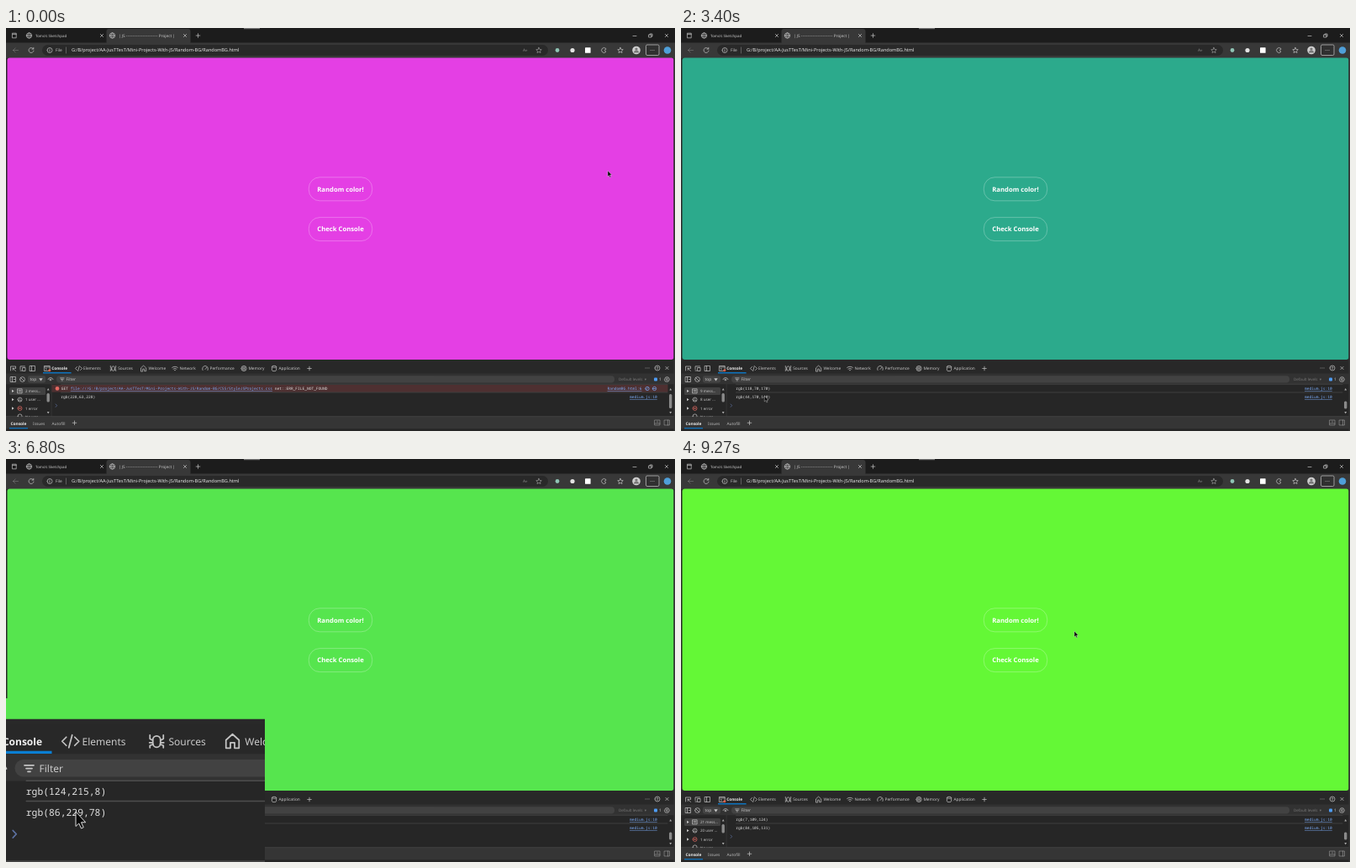
An HTML page for the animation above (9.33 s loop, 796x480 px).

```html
<!DOCTYPE html>
<html lang="en">
<head>
<meta charset="utf-8">
<title>Random color</title>
<style>
  html, body { margin: 0; width: 100%; height: 100%; overflow: hidden; background: #262626; }
  svg { display: block; width: 796px; height: 480px; }
  text { font-family: "Noto Sans", "Open Sans", sans-serif; font-size: 4.8px; font-weight: 500;
         fill: #c9c9c9; text-rendering: geometricPrecision; white-space: pre; }
  .mono { font-family: "Noto Sans Mono", "DejaVu Sans Mono", monospace; font-size: 4.56px; fill: #e0e0e0; }
  .btn { font-weight: 700; font-size: 7.7px; fill: #fff; text-anchor: middle; }
  .icon { fill: none; stroke: #c4c4c4; stroke-width: .7; stroke-linecap: round; stroke-linejoin: round; }
  .link { fill: #7cacf8; text-decoration: underline; }
</style>
</head>
<body>
<svg viewBox="0 0 796 480">
  <defs><clipPath id="crop"><rect x="-20" y="385" width="199" height="95"/></clipPath></defs>
  <g id="scene"></g>
  <g id="lens"><use href="#scene" clip-path="url(#crop)"/></g>
</svg>
<script>
const LOOP = 9330, LOG_LAG = 125, FLASH = 65;
const NS = 'http://www.w3.org/2000/svg';
const scene = document.getElementById('scene');
const lens = document.getElementById('lens');

// click time, r, g, b
const clicks = [
  [-500, 228, 63, 228], [270, 96, 168, 70], [730, 50, 96, 180], [1270, 204, 150, 74],
  [1730, 46, 105, 111], [2200, 145, 34, 39], [2670, 118, 70, 170], [3200, 44, 170, 140],
  [3670, 82, 146, 32], [4200, 229, 92, 45], [4670, 70, 130, 200], [5200, 220, 76, 242],
  [5600, 231, 251, 104], [6200, 124, 215, 8], [6650, 86, 229, 78], [7200, 180, 90, 120],
  [7470, 75, 112, 9], [7800, 83, 227, 48], [8330, 7, 109, 124], [8730, 84, 105, 131],
  [9200, 100, 248, 54]
];

// time, x, y of the pointer tip
const path = [
  [0, 716, 170], [1730, 716, 170], [2300, 22, 476], [2600, 30, 474], [2900, 80, 446],
  [3600, 104, 436], [4200, 104, 436], [4500, 386, 248], [4720, 386, 248], [5130, 104, 452],
  [5730, 94.6, 456.6], [6500, 90, 441], [6800, 89, 439], [7200, 89, 439],
  [7600, 468, 205], [LOOP, 468, 205]
];

function add(tag, attrs, parent = scene) {
  const el = document.createElementNS(NS, tag);
  for (const k in attrs) el.setAttribute(k, attrs[k]);
  parent.append(el);
  return el;
}
const rect = (x, y, width, height, fill, rx = 0, more = {}) =>
  add('rect', { x, y, width, height, fill, rx, ...more });
const dot = (cx, cy, r, fill) => add('circle', { cx, cy, r, fill });
function text(x, y, str, attrs = {}) {
  const el = add('text', { x, y, ...attrs });
  el.textContent = str;
  return el;
}
const icon = (x, y, d, attrs = {}) =>
  add('path', { d, class: 'icon', transform: `translate(${x} ${y})`, ...attrs });

const ring = r => `M${-r} 0a${r} ${r} 0 1 0 ${2 * r} 0a${r} ${r} 0 1 0 ${-2 * r} 0`;
const ICON = {
  globe: ring(3.2) + 'M-3.2 0H3.2M0-3.2C-2-1-2 1 0 3.2C2 1 2-1 0-3.2',
  close: 'M-1.6-1.6L1.6 1.6M1.6-1.6L-1.6 1.6',
  plus: 'M-2.3 0H2.3M0-2.3V2.3',
  reload: 'M2.6-1.6A3 3 0 1 0 3 .6M2.8-3.2V-1.4H1',
  star: 'M0-3.2L1-1L3.2-.8L1.6 .8L2 3L0 1.9L-2 3L-1.6 .8L-3.2-.8L-1-1Z',
  code: 'M-2-2L-4 0L-2 2M2-2L4 0L2 2M.8-3L-.8 3',
  bug: 'M-1.8-.8A1.8 1.8 0 0 1 1.8-.8V1A1.8 1.8 0 0 1-1.8 1ZM-3.2-3V-1.2L-1.8-.4M3.2-3V-1.2L1.8-.4M-3.4 .6H-1.8M3.4 .6H1.8M-3.2 3V2L-1.6 1.4M3.2 3V2L1.6 1.4',
  home: 'M-3.1 3.2V-.6L0-3.4L3.1-.6V3.2H1V.6H-1V3.2Z',
  wifi: 'M-3.4-1A5 5 0 0 1 3.4-1M-2 .6A3 3 0 0 1 2 .6M-.5 2.1H.5',
  gauge: 'M-3 2A3.4 3.4 0 1 1 3 2M0 1L2-1.4',
  memory: ring(3.1) + 'M-1.2-1.6V1.6M0-1.6V1.6M1.2-1.6V1.6',
  drum: 'M-2.6-2.2A2.6 1 0 1 0 2.6-2.2A2.6 1 0 1 0-2.6-2.2V2.2A2.6 1 0 0 0 2.6 2.2V-2.2',
  box: 'M-3-3H3V3H-3Z',
  term: 'M-3.2-3H3.2V3H-3.2ZM-3.2-1.6H3.2M-1.7-.2L-.6 .8L-1.7 1.8',
  ban: ring(2.9) + 'M-2-2L2 2',
  eye: 'M-3 .6A3.2 3.2 0 0 1 3 .6M-.9 1A.9 .9 0 1 0 .9 1A.9 .9 0 1 0-.9 1',
  funnel: 'M-2.2-1.5H2.2M-1.4 0H1.4M-.6 1.5H.6',
  more: 'M-2 0H-1.9M0 0H.1M2 0H2.1',
  list: 'M-2.6-2.6H2.6V2.6H-2.6ZM-1.4-1H1.4M-1.4 .6H1.4'
};

function browser() {
  rect(-20, 0, 836, 500, '#292929');
  rect(0, 0, 796, 18, '#1c1c1c');
  rect(283, 0, 19, 1.2, '#777');
  rect(119.5, 1, 100, 19, '#383838', 3);
  rect(0, 17.5, 796, 18.5, '#383838');
  icon(10, 9, 'M-2.2-2.8H2.2V2.8H-2.2ZM-2.2-1.6H2.2', { 'stroke-width': 1 });
  icon(27.5, 9, ICON.globe);
  text(35, 10.8, "Tomo's Sketchpad", { style: 'font-size:4.4px' });
  icon(114, 9, ICON.close);
  icon(126.5, 9, ICON.globe);
  text(134, 10.8, '| JS ' + '-'.repeat(25) + ' Project |', { style: 'font-size:4.7px' });
  icon(213, 9, ICON.close);
  icon(228.5, 9, ICON.plus);
  icon(748, 9, 'M-2 .5H2');
  icon(767, 9, 'M-2-1H1V2H-2ZM-1-1V-2H2V1H1');
  icon(786, 9, ICON.close);

  icon(11.5, 26.5, 'M3 0H-3M-.4-2.6L-3 0L-.4 2.6', { opacity: .4 });
  icon(30, 26.5, ICON.reload);
  rect(43, 20, 602, 13, '#292929', 6.5);
  icon(52, 26.5, ring(3) + 'M0-.3V1.5M0-1.5V-1.4');
  text(59, 28.4, 'File');
  icon(71.5, 26.5, 'M0-3.5V3.5', { opacity: .5 });
  text(78, 28.4, 'G:/B/project/AA-JusTTesT/Mini-Projects-With-JS/Random-BG/RandomBG.html',
    { style: 'font-size:5.55px;fill:#e4e4e4' });
  text(615, 28.4, 'A»', { opacity: .6 });
  icon(634, 26.5, ICON.star, { opacity: .7 });
  dot(656, 26.5, 2.4, '#8fc4b4');
  dot(674, 26.5, 2.6, '#e2e2e2');
  rect(689, 23.2, 6.6, 6.6, '#fff', .6);
  icon(711, 26.5, 'M2.4-2.4A3 3 0 1 0 2.4 2.4V1A1 1 0 0 1 2.4-1Z');
  icon(731, 26.5, ICON.star);
  dot(750, 26.5, 4.8, '#cfcfcf');
  dot(750, 25, 1.6, '#777');
  add('path', { d: 'M747 29.4A3 3 0 0 1 753 29.4Z', fill: '#777' });
  rect(761.5, 20, 15.5, 12.5, '#303030', 1.5, { stroke: '#c8c8c8', 'stroke-width': .7 });
  icon(769, 26.5, ICON.more, { 'stroke-width': 1 });
  dot(787, 26.5, 4.3, '#4f9fd8');
}

function button(y, label) {
  const face = rect(360.3, y, 75.4, 28, '#fff', 13,
    { stroke: '#fff', 'stroke-width': .7, 'stroke-opacity': .38 });
  text(398, y + 16.7, label, { class: 'btn' });
  return face;
}

function devtools() {
  rect(0, 397.5, 796, 14, '#282828');
  rect(0, 411.5, 796, 13, '#323232');
  rect(0, 424.5, 796, 39, '#262626');
  rect(0, 463, 796, 14.5, '#353535');
  rect(0, 477.5, 796, 2.5, '#262626');
  rect(0, 462.3, 796, .8, '#454545');
  rect(794.5, 36, 1.5, 444, '#333');

  icon(8.5, 405.5, 'M-3 2.5V-2.5H3V0M-.3-.2L3 3M-.3-.2V2M-.3-.2H2');
  icon(20, 405.5, 'M-3 1V-2.6H2.4M-1 2.6H-3M0-1H3V3H0Z');
  icon(31.5, 405.5, ICON.box + 'M-1-3V3');
  icon(49, 405.5, ICON.term);
  dot(51.8, 407.8, 1.5, '#e0604c');
  text(54.2, 407.3, 'Console', { style: 'font-weight:600;fill:#f0f0f0' });
  rect(44, 410.1, 33.6, 1.3, '#0a7fd4');
  const tabs = [
    [86.5, 'code', 92, 'Elements'], [127.5, 'bug', 133.2, 'Sources'],
    [163.6, 'home', 169.5, 'Welcome'], [201, 'wifi', 206.5, 'Network'],
    [237, 'gauge', 242.5, 'Performance'], [283, 'memory', 288.5, 'Memory'],
    [319, 'drum', 324.5, 'Application']
  ];
  for (const [x, name, tx, label] of tabs) {
    icon(x, 405.5, ICON[name]);
    text(tx, 407.3, label);
  }
  icon(361, 405.5, ICON.plus);
  icon(763, 405, ICON.more, { 'stroke-width': 1 });
  icon(775, 405, ring(3) + 'M-.9-.8A.9 .9 0 1 1 0 .4M0 1.6V1.7');
  icon(786.5, 405, ICON.close, { 'stroke-width': .9 });

  icon(8.5, 418.5, ICON.box + 'M-1-3V3M1 0H2');
  icon(19.5, 418.5, ICON.ban);
  rect(26, 414.2, 21, 8.2, '#444', 2);
  text(28.5, 420.2, 'top');
  add('path', { d: 'M39.3 417.2H43.7L41.5 420.4Z', fill: '#c9c9c9' });
  icon(53, 418, ICON.eye);
  rect(60, 414.2, 664, 8.2, '#424242', 4);
  icon(66.8, 418.4, ICON.funnel);
  text(71.6, 420.2, 'Filter');
  text(729, 420.2, 'Default levels  ▾', { style: 'font-size:4.5px', opacity: .45 });
  rect(771, 416.6, 4, 3.8, '#4f9cf5', 1);
  text(777, 420.2, '1');
  icon(786.5, 418.5, ring(1.1) + 'M-3 0L-1.5-2.6H1.5L3 0L1.5 2.6H-1.5Z');

  icon(.1, 0, 'M54 424.5V463', { style: 'stroke:#444;stroke-width:.5' });
  rect(4, 428, 43, 9, '#414141', 1.5);
  [432.4, 442.6, 453, 462.4].forEach((y, i) => {
    if (i < 3) add('path', { d: `M7 ${y - 1.7}L9.6 ${y}L7 ${y + 1.7}Z`, fill: '#c9c9c9' });
    icon(16.5, y, i ? ring(2.5) : ICON.list,
      i === 2 ? { style: 'stroke:#e46962' } : {});
  });
  icon(16.5, 442.6, 'M-1.3 1.6A1.3 1.3 0 0 1 1.3 1.6M0-1V-.9', { 'stroke-width': 1.3 });
  icon(16.5, 453, 'M-.8-.8L.8 .8M.8-.8L-.8 .8', { style: 'stroke:#e46962' });
  const small = { style: 'font-size:4.5px' };
  ui.messages = text(23, 434.2, '', small);
  ui.users = text(23, 444.4, '', small);
  text(23, 454.8, '1 error', small);
  text(23, 464.6, 'No war…', small);
  rect(2, 463.1, 52, 6, '#353535');
  rect(48.5, 435, 3.4, 10.5, '#8a8a8a', 1.5);
  add('path', { d: 'M48.8 431.5L50.2 429L51.6 431.5ZM48.8 457L50.2 459.5L51.6 457Z', fill: '#aaa' });

  ui.error = rect(54.5, 425, 733, 8.7, '#4e3031');
  const err = ui.errorRow = add('g', {});
  const put = (x, str, cls = 'mono') =>
    err.append(text(x, 431, str, { class: cls }));
  err.append(dot(61, 429.4, 2.3, '#e46962'));
  put(65.8, 'GET');
  put(76.8, 'file:///G:/B/project/AA-JusTTesT/Mini-Projects-With-JS/Random-BG/CSS/StyleJSProjects.css', 'mono link');
  put(319.8, 'net::ERR_FILE_NOT_FOUND');
  put(715.5, 'RandomBG.html:6', 'mono link');
  err.append(icon(763, 429.5, ring(2.2) + 'M-1 1L1-1', { style: 'stroke:#7cacf8' }));
  err.append(icon(771.5, 429.5, ring(2.2) + 'M-1 0H1', { style: 'stroke:#7cacf8' }));

  ui.older = text(65.3, 431, '', { class: 'mono' });
  ui.olderLink = text(742, 431, 'medium.js:10', { class: 'mono link' });
  ui.newest = text(65.3, 441, '', { class: 'mono' });
  text(742, 441, 'medium.js:10', { class: 'mono link' });
  icon(0, 0, 'M65.5 424.3H787M65.5 434H787', { style: 'stroke:#4d4d4d;stroke-width:.6' });
  icon(59.9, 449.7, 'M-.8-1.7L.8 0L-.8 1.7', { style: 'stroke:#5d72a3' });
  ui.thumb = rect(789, 436, 3.4, 17, '#8a8a8a', 1.5);
  add('path', { d: 'M789.3 431.5L790.7 429L792.1 431.5ZM789.3 457L790.7 459.5L792.1 457Z', fill: '#aaa' });

  text(5.5, 473, 'Console', { style: 'font-weight:600;fill:#f0f0f0' });
  rect(4, 476.2, 22, 1.1, '#0a7fd4');
  text(32, 473, 'Issues', { style: 'fill:#b8b8b8' });
  text(54.5, 473, 'Autofill', { style: 'fill:#b8b8b8' });
  icon(81.5, 470.3, ICON.plus);
  icon(775, 470, ICON.box + 'M-3 1H3M0-2V0', { opacity: .6 });
  icon(786.5, 470, ICON.box + 'M1-3V3', { opacity: .6 });
}

const ui = {};
browser();
ui.page = rect(1.5, 35.4, 793, 359.5, '#fff', 3);
ui.random = button(177.8, 'Random color!');
ui.check = button(225.6, 'Check Console');
devtools();
ui.pointer = add('g', {});
const shape = d => add('path',
  { d, fill: '#080808', stroke: '#ddd', 'stroke-width': .4, 'stroke-linejoin': 'round' }, ui.pointer);
ui.arrow = shape('M0 0V7L1.5 5.6L2.6 8L3.7 7.5L2.6 5.1H4.7Z');
ui.hand = shape('M-.8 .4Q0-.6 .8 .4V3L3.4 3.7Q4 4 3.8 5.2L3 8.4H-.6L-2.8 5Q-2.6 4-1.7 4.5L-.8 5.4Z');

const clamp = v => Math.max(0, Math.min(1, v));
const show = (el, on) => el.setAttribute('visibility', on ? 'visible' : 'hidden');
const rgb = ([, r, g, b]) => `rgb(${r},${g},${b})`;
const countAt = t => clicks.filter(c => c[0] <= t).length;

function pointerAt(t) {
  const i = Math.max(1, path.findIndex(p => p[0] > t));
  const [t0, x0, y0] = path[i - 1], [t1, x1, y1] = path[i];
  const u = (t - t0) / (t1 - t0), e = u * u * (3 - 2 * u);
  return [x0 + (x1 - x0) * e, y0 + (y1 - y0) * e];
}

// The crop's top right corner sits on whole pixels so its edge stays clean.
function drawLens(t) {
  const fadeIn = clamp((t - 4200) / 750), fadeOut = 1 - clamp((t - 9070) / 190);
  const zoom = 1 - (1 - fadeIn) ** 1.45, k = 1 + 1.5 * zoom;
  const right = Math.round(195 + 113 * zoom), top = Math.round(359 - 74 * zoom);
  lens.setAttribute('transform', `translate(${right - k * 179} ${top - k * 385}) scale(${k})`);
  lens.setAttribute('opacity', fadeIn * fadeOut);
  lens.setAttribute('display', fadeIn * fadeOut > 0 ? 'inline' : 'none');
}

function draw(t) {
  const last = clicks[countAt(t) - 1];
  ui.page.setAttribute('fill', rgb(last));
  ui.random.setAttribute('fill-opacity', t - last[0] < FLASH ? .12 : 0);

  const n = countAt(t - LOG_LAG), scrolled = n > 1;
  ui.messages.textContent = `${n + 1} mess…`;
  ui.users.textContent = `${n} user …`;
  ui.newest.textContent = rgb(clicks[n - 1]);
  ui.older.textContent = scrolled ? rgb(clicks[n - 2]) : '';
  show(ui.error, !scrolled);
  show(ui.errorRow, !scrolled);
  show(ui.olderLink, scrolled);
  ui.thumb.setAttribute('y', scrolled ? 444.5 : 436);
  ui.thumb.setAttribute('height', scrolled ? 9 : 17);

  const [x, y] = pointerAt(t);
  const over = x > 360 && x < 436 && y > 225 && y < 254;
  ui.pointer.setAttribute('transform', `translate(${x} ${y})`);
  ui.check.setAttribute('fill-opacity', over ? .14 : 0);
  show(ui.arrow, !over);
  show(ui.hand, over);
  drawLens(t);
}

const start = performance.now();
function tick() {
  draw((performance.now() - start) % LOOP);
  requestAnimationFrame(tick);
}
tick();
</script>
</body>
</html>
```
